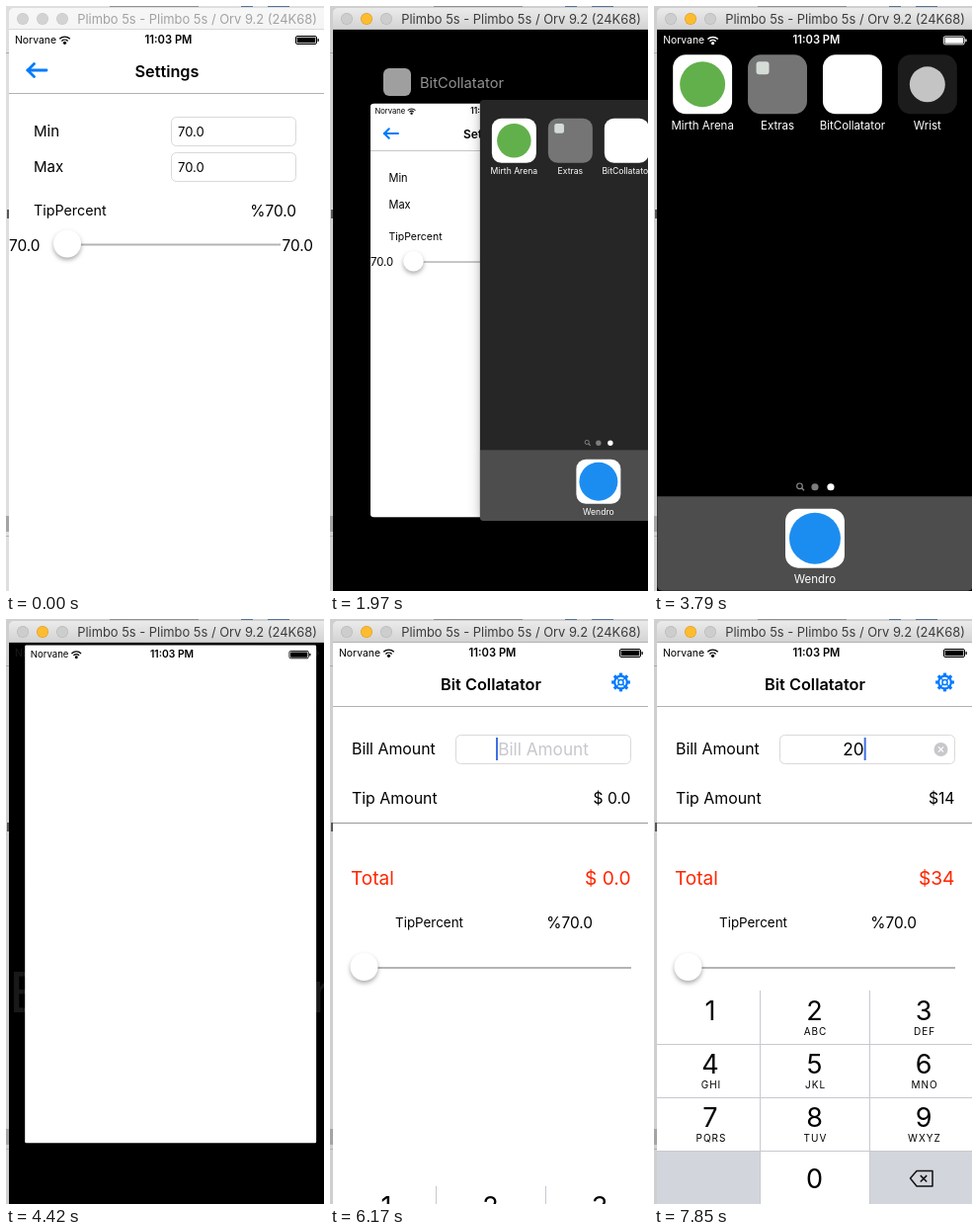
Animation of 322x592 px, one loop 8 s. Source, as an HTML page with a canvas:

```html
<!DOCTYPE html>
<html lang="en">
<head>
<meta charset="utf-8">
<title>Simulator session</title>
<style>
html, body { margin: 0; width: 100%; height: 100%; overflow: hidden; background: #fff; }
canvas { display: block; width: 322px; height: 592px; }
</style>
</head>
<body>
<canvas id="stage" width="322" height="592"></canvas>
<script>
const ctx = document.getElementById('stage').getContext('2d');
const LOOP = 8000, STEP = 70, TAU = Math.PI * 2;
const BLUE = '#007aff', RED = '#ff2600', KEY_GREY = '#d2d5db';
const APP = 'BitCollatator';

const clamp = v => Math.max(0, Math.min(1, v));
const mix = (a, b, p) => a + (b - a) * p;
const smooth = v => { v = clamp(v); return v * v * (3 - 2 * v); };
// critically damped spring from 0 to 1
const spring = (t, start, rate) => {
  const k = Math.max(0, t - start) / 1000 * rate;
  return 1 - (1 + k) * Math.exp(-k);
};
const grey = v => `rgb(${v},${v},${v})`;

function layer(alpha, draw) {
  if (alpha <= 0) return;
  ctx.save();
  ctx.globalAlpha *= clamp(alpha);
  draw();
  ctx.restore();
}

function text(str, x, y, size, { color = '#000', align = 'left', weight = 400 } = {}) {
  ctx.font = `${weight} ${size}px Inter, "Open Sans", sans-serif`;
  ctx.textAlign = align;
  ctx.fillStyle = color;
  ctx.fillText(str, x, y);
}

function rect(x, y, w, h, color) {
  ctx.fillStyle = color;
  ctx.fillRect(x, y, w, h);
}

function rounded(x, y, w, h, r, fill, stroke) {
  ctx.beginPath();
  ctx.roundRect(x, y, w, h, r);
  if (fill) { ctx.fillStyle = fill; ctx.fill(); }
  if (stroke) { ctx.strokeStyle = stroke; ctx.lineWidth = 1; ctx.stroke(); }
}

function disc(x, y, r, color) {
  ctx.beginPath();
  ctx.arc(x, y, r, 0, TAU);
  ctx.fillStyle = color;
  ctx.fill();
}

function line(points, color, width) {
  ctx.beginPath();
  points.forEach(([x, y], i) => i ? ctx.lineTo(x, y) : ctx.moveTo(x, y));
  ctx.strokeStyle = color;
  ctx.lineWidth = width;
  ctx.stroke();
}

function cross(x, y, r, color, width) {
  line([[x - r, y - r], [x + r, y + r]], color, width);
  line([[x + r, y - r], [x - r, y + r]], color, width);
}

function statusBar(color) {
  text('Norvane', 9, 38, 10.4, { color });
  for (const r of [4.4, 7.4]) {
    ctx.beginPath();
    ctx.arc(59.5, 38.5, r, -TAU * 0.375, -TAU * 0.125);
    ctx.strokeStyle = color;
    ctx.lineWidth = 1.4;
    ctx.stroke();
  }
  disc(59.5, 37.3, 1.6, color);
  text('11:03 PM', 164.5, 38, 11.2, { color, align: 'center', weight: 600 });
  rounded(293.5, 30.5, 21, 8, 1.5, null, color);
  rounded(294.7, 31.7, 18.6, 5.6, 0.5, color);
  rounded(315.5, 33, 1.3, 3, 0.6, color);
}

function navBar(title) {
  rect(3, 24, 320, 568, '#fff');
  statusBar('#000');
  text(title, 163, 72, 16.3, { align: 'center', weight: 600 });
  rect(3, 88, 320, 1, '#b2b2b2');
}

function slider(x1, x2, y, thumbX) {
  rect(x1, y - 0.5, x2 - x1, 2, '#b4b4b4');
  ctx.save();
  ctx.shadowColor = 'rgba(0,0,0,.32)';
  ctx.shadowBlur = 4;
  ctx.shadowOffsetY = 2.5;
  disc(thumbX, y - 0.5, 14, '#fff');
  ctx.restore();
}

const field = (x, y, w) => rounded(x + 0.5, y + 0.5, w - 1, 29, 5, '#fff', '#d9d9d9');

function settingsScreen() {
  navBar('Settings');
  ctx.lineCap = 'round';
  line([[22, 65], [41, 65]], BLUE, 2.8);
  line([[28.5, 58.5], [22, 65], [28.5, 71.5]], BLUE, 2.8);
  ctx.lineCap = 'butt';
  [['Min', 112], ['Max', 148]].forEach(([label, y]) => {
    text(label, 28, y + 20, 15);
    field(167, y, 127);
    text('70.0', 174, y + 20, 13);
  });
  text('TipPercent', 28, 212, 14.3);
  text('%70.0', 294, 213, 15.4, { align: 'right' });
  text('70.0', 3, 247.5, 15.4);
  text('70.0', 311, 247.5, 15.4, { align: 'right' });
  slider(50, 278, 241, 62);
}

function gear(x, y) {
  ctx.save();
  ctx.translate(x, y);
  ctx.strokeStyle = BLUE;
  for (const [r, w] of [[6.3, 2.2], [2.6, 1.5]]) {
    ctx.beginPath();
    ctx.arc(0, 0, r, 0, TAU);
    ctx.lineWidth = w;
    ctx.stroke();
  }
  for (let i = 0; i < 8; i++) {
    line([[6.6, 0], [9.4, 0]], BLUE, 3.2);
    if (i % 2) line([[2.6, 0], [6, 0]], BLUE, 1.2);
    ctx.rotate(TAU / 8);
  }
  ctx.restore();
}

function calculatorScreen(t) {
  const bill = t >= 7850 ? '20' : t >= 7290 ? '2' : '';
  const tip = { '': '$ 0.0', 2: '$1.4', 20: '$14' }[bill];
  const total = { '': '$ 0.0', 2: '$3.4', 20: '$34' }[bill];
  navBar('Bit Collatator');
  gear(294.5, 64);

  text('Bill Amount', 22, 137, 15.9);
  field(127, 117, 178);
  const centre = bill ? 202 : 216;
  text(bill || 'Bill Amount', centre, 138, 17.2,
    { align: 'center', color: bill ? '#000' : '#c7c7cd' });
  if (t >= 6170) {
    const half = ctx.measureText(bill).width / 2;
    rect(bill ? centre + half : 168, 120, 2, 23, '#3f6fe4');
  }
  if (bill) {
    disc(290.5, 132, 7, '#c7c7cc');
    cross(290.5, 132, 2.6, '#fff', 1.3);
  }

  text('Tip Amount', 22, 187, 15.9);
  text(tip, 304.5, 187, 15.7, { align: 'right' });
  rect(3, 206, 320, 1, '#9a9a9a');
  text('Total', 21, 269, 19, { color: RED });
  text(total, 304.5, 269, 19.2, { color: RED, align: 'right' });
  text('TipPercent', 66, 311.5, 13.4);
  text('%70.0', 266, 313, 15.4, { align: 'right' });
  slider(21, 305, 352.5, 34.5);
}

function keypad(t) {
  const letters = ['', 'ABC', 'DEF', 'GHI', 'JKL', 'MNO', 'PQRS', 'TUV', 'WXYZ'];
  const columns = [57, 162.5, 273];
  ctx.save();
  ctx.translate(0, 216 * (1 - spring(t, 6130, 12)));
  rect(3, 376, 320, 216, '#fff');
  rect(3, 538, 105, 54, KEY_GREY);
  rect(218, 538, 105, 54, KEY_GREY);

  const twoHeld = t >= 7220 ? clamp((7430 - t) / 140) : 0;
  layer(twoHeld, () => rect(108, 376, 111, 54, KEY_GREY));
  if (t >= 7780 && t < 7850) rect(108, 538, 111, 54, KEY_GREY);

  for (const y of [430, 484, 538]) rect(3, y, 320, 1, '#c8c9ce');
  for (const x of [107, 218]) rect(x, 376, 1, 216, '#c8c9ce');
  letters.forEach((word, i) => {
    const x = columns[i % 3], y = 376 + 54 * Math.floor(i / 3);
    text(i + 1, x, y + 30, 27, { align: 'center' });
    ctx.letterSpacing = '1px';
    text(word, x + 1, y + 45, 10, { align: 'center' });
    ctx.letterSpacing = '0px';
  });
  text('0', 162.5, 575.5, 27, { align: 'center' });

  ctx.lineJoin = 'round';
  line([[259.5, 566], [266, 558.5], [282, 558.5], [282, 574], [266, 574], [259.5, 566], [266, 558.5]], '#111', 1.5);
  cross(273, 566.3, 3.2, '#111', 1.5);
  ctx.lineJoin = 'miter';
  ctx.restore();
}

function homeIcon(name, x, y, tile, dot) {
  if (tile) rounded(x - 30, y - 30, 60, 60, 13, tile);
  if (dot) disc(x, y, dot[0], dot[1]);
  text(name, x, y + 45.5, 11.5, { color: '#fff', align: 'center' });
}

function homeScreen(statusAlpha) {
  layer(statusAlpha, () => statusBar('#fff'));
  rect(3, 496.5, 320, 96, grey(77));
  homeIcon('Mirth Arena', 49, 79, '#fff', [23, '#62b04b']);
  homeIcon('Extras', 125, 79, '#757575');
  rounded(103.5, 56, 13, 13, 3, '#d5dcd6');
  homeIcon(APP, 201, 79, '#fff');
  homeIcon('Wrist', 277, 79, '#1c1c1c', [18, '#c4c4c4']);
  homeIcon('Wendro', 163, 539, '#fff', [26, '#1c8df0']);
  ctx.beginPath();
  ctx.arc(147.5, 486, 2.8, 0, TAU);
  ctx.strokeStyle = '#8a8a8a';
  ctx.lineWidth = 1.2;
  ctx.stroke();
  line([[149.5, 488], [152, 490.5]], '#8a8a8a', 1.4);
  disc(163, 487, 3.6, '#7d7d7d');
  disc(179, 487, 3.6, '#fff');
}

// draws a full screen shrunk to a card that stays centred vertically
function card(left, scale, lift, shadow, fill, draw) {
  const radius = scale < 0.999 ? 5 : 0;
  ctx.save();
  ctx.translate(left, 308 - 284 * scale - lift);
  ctx.scale(scale, scale);
  ctx.translate(-3, -24);
  ctx.save();
  ctx.shadowColor = `rgba(0,0,0,${shadow})`;
  ctx.shadowBlur = 12;
  rounded(3, 24, 320, 568, radius, fill);
  ctx.restore();
  ctx.beginPath();
  ctx.roundRect(3, 24, 320, 568, radius);
  ctx.clip();
  draw();
  ctx.restore();
}

function switcher(t) {
  const open = t < 1690 ? 0 : spring(t, 1664, 17.4);
  const dismiss = smooth((t - 2480) / 260);
  const lift = 520 * dismiss;
  if (dismiss < 1) {
    card(mix(3, 42.2, open), mix(1, 0.728, open), lift, 0, '#fff', settingsScreen);
    layer(clamp((t - 1760) / 300) * (1 - dismiss), () => {
      rounded(54, 63 - lift, 28, 28, 6, '#e2e2e2');
      text(APP, 91, 83 - lift, 14.7, { color: '#d0d0d0' });
    });
  }
  const left = mix(mix(3, 156.6, open), 39, dismiss);
  layer(open * 1.45, () =>
    card(left, mix(1, 0.742, open), 0, 0.3 * open, grey(38), () => homeScreen(0)));
}

function zoomHome(t) {
  const p = spring(t, 3170, 12);
  const reveal = clamp(p * 1.5);
  card(mix(39, 3, p), mix(0.742, 1, p), 0, 0, grey(Math.round(38 * (1 - reveal))),
    () => homeScreen(reveal));
}

function launch(t) {
  const p = spring(t, 4110, 12.7);
  const left = mix(171, 3, p), right = mix(231, 323, p);
  const top = mix(49, 24, p), bottom = mix(109, 592, p ** 1.35);
  const width = right - left, zoom = width / 60;

  layer(1 - p, () => {
    ctx.save();
    ctx.translate(left + width / 2, top + width / 2);
    ctx.scale(zoom, zoom);
    ctx.translate(-201, -79);
    homeScreen(0);
    ctx.restore();
    statusBar('#fff');
  });

  rounded(left, top, width, bottom - top, 13 * (1 - p), '#fff');
  layer((p - 0.3) * 2, () => {
    ctx.translate(left, top);
    ctx.scale(width / 320, width / 320);
    ctx.translate(-3, -24);
    statusBar('#000');
  });
}

function calculator(t) {
  rect(3, 24, 320, 568, '#fff');
  statusBar('#000');
  layer((t - 4910) / 280, () => calculatorScreen(t));
  if (t >= 6170) keypad(t);
}

function desktop(active) {
  rect(0, 0, 322, 592, active ? '#cfcfcf' : '#dedede');
  rect(0, 47, 3, 1, '#a8a8a8');
  rect(1, 206, 2, 9, '#565656');
  rect(0, 516, 3, 16, '#a4a4a4');
  rect(0, 536, 3, 1, '#b0b0b0');
  rect(105, 0, 90, 1, '#8d9196');
  rect(238, 0, 12, 1, '#55739a');
  rect(265, 0, 22, 1, '#55739a');
}

function titleBar(active) {
  const fill = ctx.createLinearGradient(0, 2, 0, 24);
  fill.addColorStop(0, active ? '#ebebeb' : '#f7f7f7');
  fill.addColorStop(1, active ? '#d2d2d2' : '#f4f4f4');
  rounded(3, 2, 326, 22, [5, 0, 0, 0], fill);
  rect(3, 23, 320, 1, active ? '#b4b4b4' : '#d8d8d8');
  [17, 37, 57].forEach((x, i) => {
    const lit = active && i === 1;
    disc(x, 13, 6, lit ? '#dfa023' : active ? '#b9b9b9' : '#c8c8c8');
    disc(x, 13, 5.3, lit ? '#fdbc30' : active ? '#cdcdcd' : '#d3d3d3');
  });
  text('Plimbo 5s - Plimbo 5s / Orv 9.2 (24K68)', 193.5, 18, 12.9,
    { align: 'center', color: active ? '#3c3c3c' : '#a2a2a2' });
}

function paint(t) {
  const active = t >= 500;
  desktop(active);
  ctx.save();
  ctx.beginPath();
  ctx.rect(3, 24, 319, 568);
  ctx.clip();
  rect(3, 24, 319, 568, '#000');
  if (t < 3230) switcher(t);
  else if (t < 4140) zoomHome(t);
  else if (t < 4980) launch(t);
  else calculator(t);
  ctx.restore();
  titleBar(active);
}

function tick() {
  const t = performance.now() % LOOP;
  const stepped = t < 500 ? 0 : 500 + Math.floor((t - 500) / STEP) * STEP;
  paint(Math.min(stepped, 7850));
  requestAnimationFrame(tick);
}
tick();
</script>
</body>
</html>
```
